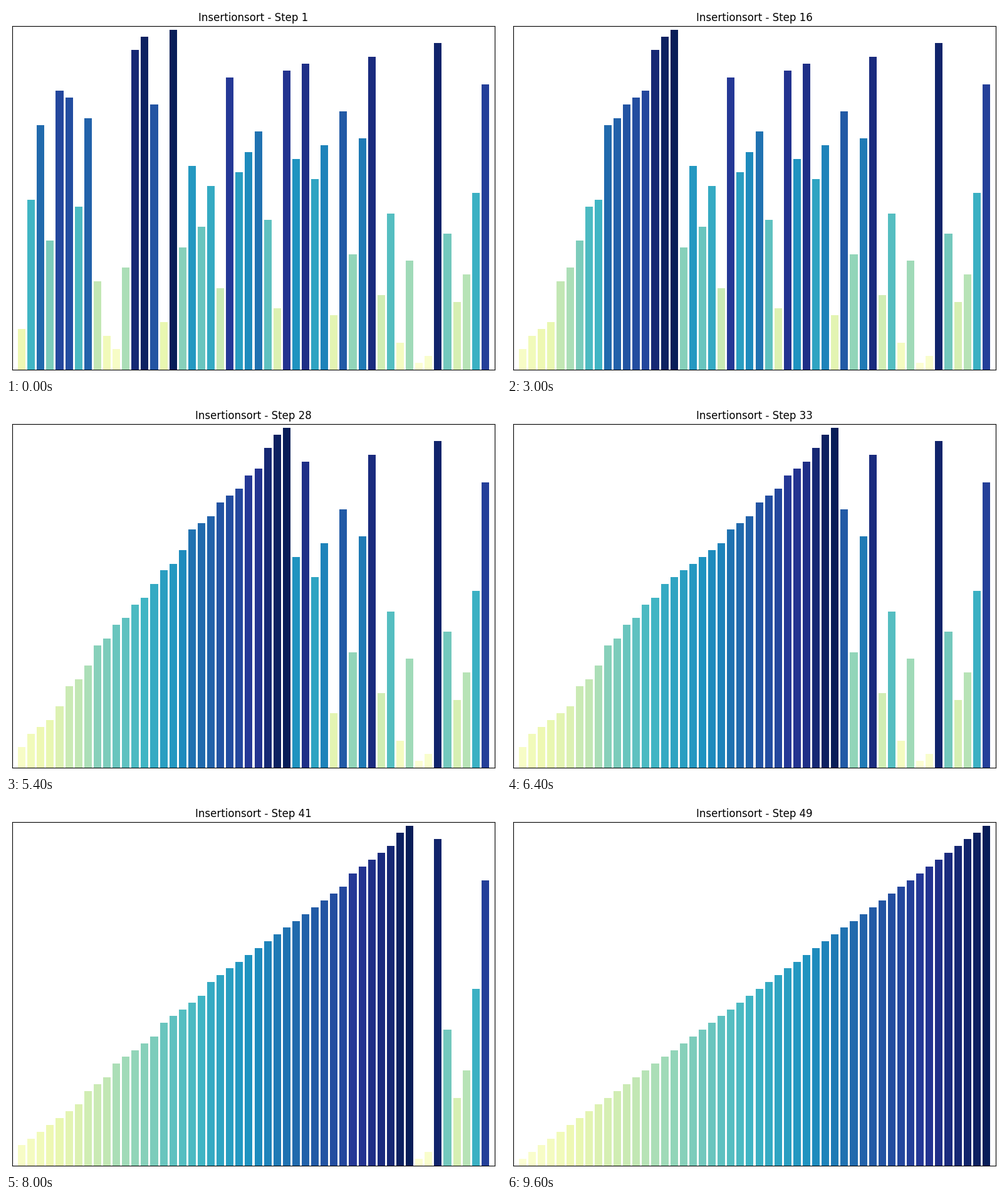
Animation, 790 px wide and 590 px high, one loop 9.8 s. Source, as a matplotlib script:

```python
import matplotlib.pyplot as plt
from matplotlib.animation import FuncAnimation

W, H, DPI = 790, 590, 100
MARGIN, PLOT_W, PLOT_H = 10, 770, 547.67
STEP_MS = 200

# The unsorted input: a shuffle of 1 to 50.
START = [6, 25, 36, 19, 41, 40, 24, 37, 13, 5, 3, 15, 47, 49, 39, 7, 50,
         18, 30, 21, 27, 12, 43, 29, 32, 35, 22, 9, 44, 31, 45, 28, 33, 8,
         38, 17, 34, 46, 11, 23, 4, 16, 1, 2, 48, 20, 10, 14, 26, 42]
N = len(START)


def insertion_steps(values):
    """Yield the list each time one more value has been moved into place."""
    values = list(values)
    for i in range(1, len(values)):
        j = i
        while j > 0 and values[j - 1] > values[j]:
            values[j - 1], values[j] = values[j], values[j - 1]
            j -= 1
        yield list(values)


plt.rcParams["font.family"] = "DejaVu Sans"
cmap = plt.get_cmap("YlGnBu")
steps = list(insertion_steps(START))

fig = plt.figure(figsize=(W / DPI, H / DPI), dpi=DPI, facecolor="white")
ax = fig.add_axes([MARGIN / W, MARGIN / H, PLOT_W / W, PLOT_H / H])
ax.set(xlim=(-1, N), ylim=(0, N * 1.01), xticks=[], yticks=[])
bars = ax.bar(range(N), START, width=0.8)
title = ax.set_title("", fontsize=12)


def update(frame):
    for bar, value in zip(bars, steps[frame]):
        bar.set_height(value)
        bar.set_facecolor(cmap(value / N))
    title.set_text(f"Insertionsort - Step {frame + 1}")
    return [*bars, title]


anim = FuncAnimation(fig, update, frames=len(steps), interval=STEP_MS,
                     repeat=True, repeat_delay=0, blit=False)
plt.show()
```
